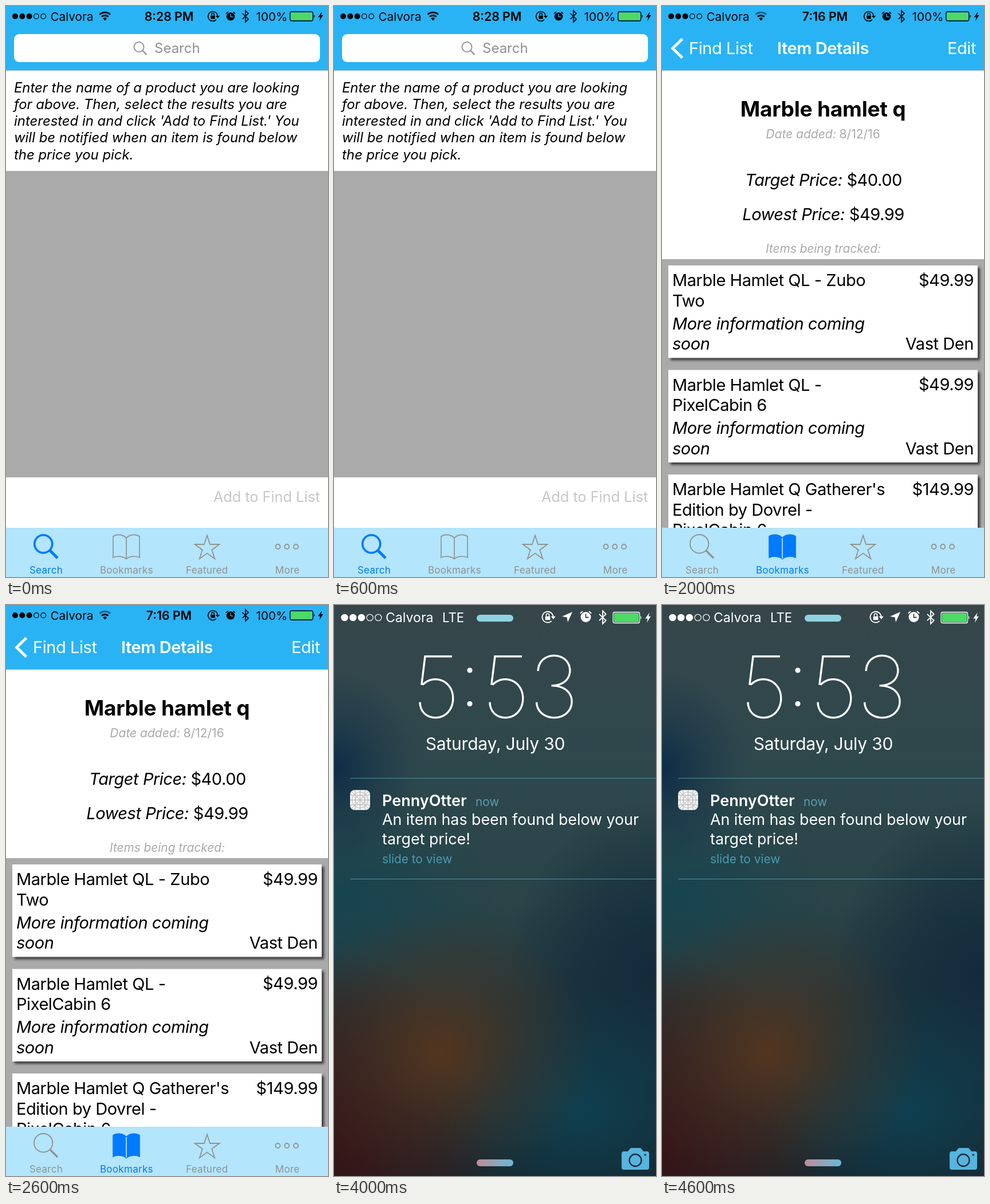
These frames come from a looping animation (562 px wide and 997 px high, 5 s). An HTML page:

```html
<!DOCTYPE html>
<html lang="en">
<head>
<meta charset="utf-8">
<title>Price tracker tour</title>
<style>
  html, body { margin: 0; width: 100%; height: 100%; overflow: hidden; background: #fff; }
  svg { display: block; width: 562px; height: 997px; font-family: Inter, Roboto, "Liberation Sans", sans-serif; }
  .card { filter: drop-shadow(4px 4px 2px rgba(0, 0, 0, .65)); }
  .lock {
    background:
      radial-gradient(270px 250px at 185px 780px, #53351f, rgba(83, 53, 31, .4) 50%, transparent),
      radial-gradient(270px 360px at 0 960px, #371517, rgba(55, 21, 23, .6) 50%, transparent),
      radial-gradient(260px 210px at 430px 880px, #0e3f50, rgba(14, 63, 80, .5) 50%, transparent),
      radial-gradient(260px 300px at 562px 640px, #122b3c, rgba(18, 43, 60, .6) 50%, transparent),
      radial-gradient(150px 170px at 0 285px, #0e2c47, rgba(14, 44, 71, .4) 50%, transparent),
      radial-gradient(260px 180px at 20px 510px, #17444f, rgba(23, 68, 79, .5) 50%, transparent),
      linear-gradient(#36464b, #2d484c 30%, #2a4448 52%, #20353b 72%, #16252e);
  }
</style>
</head>
<body>
<svg id="stage" viewBox="0 0 562 997"></svg>
<script>
const SKY = '#29b3f5', PALE = '#b3e5fc', BLUE = '#007aff', GREY = '#929292', GREEN = '#4cd964';
const MID = 'text-anchor="middle" ', END = 'text-anchor="end" ', ITALIC = 'font-style="italic" ';
const WHITE = 'fill="#fff" ', BOLD = 'font-weight="600" ';
const line = (color, width) => `fill="none" stroke="${color}" stroke-width="${width}" `;

const text = (x, y, size, str, attrs = '') =>
  `<text x="${x}" y="${y}" font-size="${size}" ${attrs}>${str}</text>`;
const body = (x, y, str, attrs = '') => text(x, y, 29, str, 'letter-spacing="-.44" ' + attrs);
const button = (x, y, str, attrs = '') => text(x, y, 25.6, str, 'letter-spacing="-.15" ' + attrs);
const rect = (x, y, w, h, fill, attrs = '') =>
  `<rect x="${x}" y="${y}" width="${w}" height="${h}" fill="${fill}" ${attrs}/>`;
const circle = (x, y, r, attrs = '') => `<circle cx="${x}" cy="${y}" r="${r}" ${attrs}/>`;
const path = (d, attrs = '') => `<path d="${d}" ${attrs}/>`;
const at = (x, y, scale, inner) => `<g transform="translate(${x} ${y}) scale(${scale})">${inner}</g>`;
const range = (n, fn) => Array.from({ length: n }, (_, i) => fn(i)).join('');
const card = (x, y, w, h, fill) => rect(x, y, w, h, fill, 'class="card"');
const field = (label, value) => `<tspan ${ITALIC}>${label}:</tspan> ${value}`;

// Status bar icons, each centred on its own origin
const ink = width => line('currentColor', width);
const wifi = fade =>
  path('M-9.2-2.6A13.5 13.5 0 0 1 9.2-2.6', ink(3) + `opacity="${fade}"`) +
  path('M-5.8 1.3A8.5 8.5 0 0 1 5.8 1.3', ink(2.8)) +
  path('M0 8L-3.5 4.3A5 5 0 0 1 3.5 4.3Z');
const rotationLock =
  path('M5.9 5.9A8.3 8.3 0 1 1 8.3 0', ink(1.6)) + path('M5-1h7l-3.5 4.5z') +
  rect(-3.7, -1, 7.4, 5.5, 'currentColor') + path('M-2.2-1v-2a2.2 2.2 0 0 1 4.4 0v2', ink(1.4));
const alarm = hands =>
  circle(0, .4, 7.2) + path('M-7.8-4.6L-4.4-7.6M7.8-4.6L4.4-7.6', ink(1.7)) +
  path('M0-4V1H4', line(hands, 1.5));
const bluetooth = path('M-5.5-5L5 5L0 10V-10L5-5L-5.5 5', ink(1.7));
const bolt = path('M2.5-8L-4.5 1.5H-.5L-2 8L4.5-2H.8Z');
const arrow = path('M9-9L1 9L-.5 .5L-9-1Z');

const battery = (x, y, w, h) =>
  rect(x, y, w, h, 'none', 'rx="3" stroke="currentColor" stroke-width="1.3"') +
  rect(x + 1.6, y + 1.6, w - 3.2, h - 3.2, GREEN, 'rx="1.5"') +
  path(`M${x + w + 1.5} ${y + h / 2 - 3}q3 3 0 6z`);
const signal = (x, y, r, step) =>
  range(5, i => circle(x + i * step, y, i < 3 ? r : r - .6, i < 3 ? '' : ink(1.2)));

const status = (time, fade = .45) => '<g color="#000">' +
  signal(16, 18, 5, 12.3) + text(77.5, 25.5, 20.7, 'Calvora') + at(172.7, 17.5, 1, wifi(fade)) +
  text(284.5, 25.5, 21.2, time, MID + BOLD) +
  at(361, 18, 1, rotationLock) + at(392, 18, 1, alarm(SKY)) + at(418, 18, 1, bluetooth) +
  text(436.5, 25.5, 20.7, '100%') + battery(495.7, 10, 40, 16) + at(549, 18, 1, bolt) + '</g>';

const header = () => rect(0, 0, 562, 112, SKY) + rect(0, 112, 562, 1, '#9ab8c6');
const navBar = () => header() + path('M35.5 57.5L18.5 74L35.5 90.5', line('#fff', 4.8)) +
  body(47, 84, 'Find List', WHITE) + body(281, 84, 'Item Details', WHITE + MID + BOLD) +
  body(548, 84, 'Edit', WHITE + END);

const searchBox = width => header() + rect(14, 49, width, 49, '#fff', 'rx="9"');
const lens = x => circle(x, 71.5, 8.6, line('#8e8e93', 1.8)) +
  path(`M${x + 6} 77.5l7.5 7.5`, line('#8e8e93', 2.4));

const star = () => 'M' + Array.from({ length: 10 }, (_, i) => {
  const a = i * Math.PI / 5, r = i % 2 ? 8.6 : 22.5;
  return `${(351 + r * Math.sin(a)).toFixed(1)} ${(947 - r * Math.cos(a)).toFixed(1)}`;
}).join('L') + 'Z';

const tabBar = active => {
  const tint = i => i === active ? BLUE : GREY;
  const onSearch = active === 0, onBook = active === 1;
  const book = 'M210 929C204 922 192 922 187 926V963C193 960 204 960 210 965.5' +
    'C216 960 227 960 233 963V926C228 922 216 922 210 929';
  return rect(0, 911, 562, 86, PALE) +
    circle(65.2, 939.2, onSearch ? 15.5 : 16.2, line(tint(0), onSearch ? 3.6 : 1.8)) +
    path('M76.5 950.5L90 964', line(tint(0), onSearch ? 5 : 3.2)) +
    path(book, `fill="${onBook ? BLUE : 'none'}" stroke="${tint(1)}" stroke-width="1.7"`) +
    path('M210 929V965', line(onBook ? PALE : GREY, 1.7)) +
    path(star(), line(GREY, 1.8)) +
    range(3, i => circle(474.5 + i * 15.8, 944, 4, line(GREY, 1.8))) +
    ['Search', 'Bookmarks', 'Featured', 'More'].map((name, i) =>
      text(70 + i * 140.4, 991, 17, name, MID + `letter-spacing=".3" fill="${tint(i)}"`)).join('');
};

const checkbox = (y, checked) => checked
  ? rect(47.5, y, 31.5, 31.5, '#f00', 'rx="3"') + path(`M52.5 ${y + 16}l7 7.5l14.5-15`, line('#dff3fd', 3.2))
  : rect(49, y + 1.5, 28.5, 28.5, 'none', 'rx="2" stroke="#f00" stroke-width="3"');

const searchEmpty = () => searchBox(534) + status('8:28 PM', .9) + lens(232) +
  text(259, 81.5, 24, 'Search', 'fill="#8e8e93"') +
  ['Enter the name of a product you are looking', 'for above. Then, select the results you are',
   "interested in and click 'Add to Find List.' You", 'will be notified when an item is found below',
   'the price you pick.'].map((s, i) => text(14, 150.5 + i * 29.3, 23.9, s, ITALIC)).join('') +
  rect(0, 288, 562, 535, '#aaa') + button(548, 866, 'Add to Find List', END + 'fill="#c8c8c8"') + tabBar(0);

const result = (y, h, lines, price, store) => card(21, y, 520, h, PALE) +
  lines.map((s, i) => body(91, y + 36 + i * 35.6, s)).join('') +
  button(436, y + 32.5, price) + (store ? button(436, y + h - 17 - (lines.length > 2 ? 17 : 0), store) : '');

const setTarget = () => rect(0, 113, 562, 360, '#aaa') + searchBox(407.5) + status('8:30 PM') + lens(37) +
  text(64.5, 81.5, 24, 'Nadia') + circle(395, 74, 12.5, 'fill="#8e8e93"') +
  path('M390.3 69.3l9.4 9.4m0-9.4l-9.4 9.4', line('#fff', 2.2)) + body(441, 83, 'Cancel', WHITE) +
  result(130, 86, ['18 Quiet Afternoon', 'Tunes [CD]'], '$4.99', 'Vast...') + checkbox(157, true) +
  result(233.5, 121, ['Golden Harbor Voices:', 'The Pick of Nadia', 'Pendrow [CD]'], '$4.99', 'Vast...') +
  checkbox(278, true) +
  result(372, 140, ['5-Comedy Smile Box:', 'Following Nadia', 'Pendrow/Lift Her to the'], '$9.99') +
  checkbox(453, false) +
  rect(0, 470, 562, 441, '#fff') +
  button(15, 513.5, 'Cancel', `fill="${BLUE}"`) + button(548, 513.5, 'Confirm', END + `fill="${BLUE}"`) +
  text(28, 617.5, 32.2, 'Target price: $') +
  path('M291 582.5H534M291 628.5H534', line('#c4c4c4', 1.2)) + text(420, 621, 41, '4', MID + 'fill="#333"') +
  text(14, 680.5, 20.7, 'You will be notified when one of your selected items') +
  text(14, 705, 20.7, 'has been foundnd at or below this price') + tabBar(0);

const title = str => text(281, 193, 37, str, MID + 'font-weight="700" letter-spacing="-.2"');
const tracked = (y, name, price) => card(11, y, 540, 161.5, '#fff') +
  name.map((s, i) => body(18, y + 36 + i * 35.6, s)).join('') + body(544, y + 35.5, price, END);
const pending = y => body(18, y + 111.5, 'More information coming', ITALIC) +
  body(18, y + 147, 'soon', ITALIC) + body(544, y + 147, 'Vast Den', END);

const gameDetails = () => navBar() + status('7:16 PM') + title('Marble hamlet q') +
  text(281, 230.5, 21, field('Date added', '8/12/16'), MID + 'fill="#aaa"') +
  body(282, 313.5, field('Target Price', '$40.00'), MID) +
  body(281.5, 374, field('Lowest Price', '$49.99'), MID) +
  text(281.5, 430.5, 20.8, 'Items being tracked:', MID + ITALIC + 'fill="#aaa"') +
  rect(0, 442, 562, 470, '#aaa') +
  tracked(453, ['Marble Hamlet QL - Zubo', 'Two'], '$49.99') + pending(453) +
  tracked(635.5, ['Marble Hamlet QL -', 'PixelCabin 6'], '$49.99') + pending(635.5) +
  tracked(818, ["Marble Hamlet Q Gatherer's", 'Edition by Dovrel -', 'PixelCabin 6'], '$149.99') + tabBar(1);

const albumDetails = () => navBar() + status('7:04 PM') + title('Hanno reed') +
  body(282, 267, field('Target Price', '$16.00'), MID) +
  body(281, 331, field('Lowest Price', '$5.99'), MID) +
  body(282, 374, field('Date added', 'Date added'), MID) +
  body(281.5, 438, 'Items being tracked:', MID + ITALIC) +
  rect(0, 453, 562, 458, '#aaa') + card(11, 463, 540, 90, '#def5de') +
  body(18, 499, '505s &amp; Frostbloom [CD]') + body(544, 499, '$5.99', END) +
  body(544, 538.5, 'Vast Den', END) + tabBar(1);

const gridIcon = () => rect(28, 323, 35, 35, '#f1f1f1', 'rx="8"') +
  path('M28 332H63M28 340.5H63M28 349H63M37 323V358M45.5 323V358M54 323V358M31 326L60 355M60 326L31 355',
    line('#b4b4b4', .9)) +
  circle(45.5, 340.5, 8, line('#b4b4b4', .9)) + circle(45.5, 340.5, 14, line('#b4b4b4', .9));

const camera = () =>
  path('M506 954H513L517 949Q518 948 520 948H533Q535 948 536 949L540 954H546Q550 954 550 958V982Q550 986 546 986' +
    'H506Q502 986 502 982V958Q502 954 506 954Z', 'fill="#57b4de"') +
  circle(526, 969.5, 10.5, line('#17303d', 2.4)) + circle(543, 960, 1.8, 'fill="#17303d"');

const lockScreen = () => '<g color="#fff" fill="#fff">' +
  signal(18.5, 22, 6.2, 14.7) + text(90, 30, 23.1, 'Calvora') + text(189, 30, 22.2, 'LTE') +
  rect(249, 17, 64, 12, '#8fd3e0', 'rx="6"') +
  at(373, 21, 1.15, rotationLock) + at(407, 21, 1, arrow) + at(439.5, 20.5, 1.25, alarm('#3a4a4e')) +
  at(469, 21.5, 1.12, bluetooth) + battery(487, 12.5, 46.5, 19) + at(548, 22, 1.1, bolt) +
  [[179, '5'], [301, '5'], [384, '3']].map(([x, s]) => text(x, 197, 150, s, MID + 'font-weight="100"')).join('') +
  circle(237, 114, 4.6) + circle(237, 172.5, 4.6) +
  text(281.5, 253, 30, 'Saturday, July 30', MID + 'letter-spacing="-.2"') +
  path('M28 302.5H562M28 478.5H562', line('#4f8f9f', 1.2)) + gridIcon() +
  text(84, 350.5, 27, 'PennyOtter', BOLD) + text(247, 350.5, 20.6, 'now', 'fill="#5a9cb0"') +
  text(84, 384, 26.8, 'An item has been found below your') + text(84, 417.5, 26.8, 'target price!') +
  text(84, 450.5, 20.8, 'slide to view', 'fill="#4a9bb0"') + '</g>' +
  '<linearGradient id="grip"><stop stop-color="#c08d96"/><stop offset="1" stop-color="#68b9d8"/></linearGradient>' +
  rect(249, 968, 64, 12, 'url(#grip)', 'rx="6"') + camera();

const scenes = [searchEmpty, setTarget, gameDetails, albumDetails, lockScreen];
const stage = document.getElementById('stage');
let shown = -1;

function tick() {
  const now = Math.floor(performance.now() % 5000 / 1000);
  if (now !== shown) {
    shown = now;
    stage.innerHTML = scenes[now]();
    stage.classList.toggle('lock', now === 4);
  }
  requestAnimationFrame(tick);
}
tick();
</script>
</body>
</html>
```
